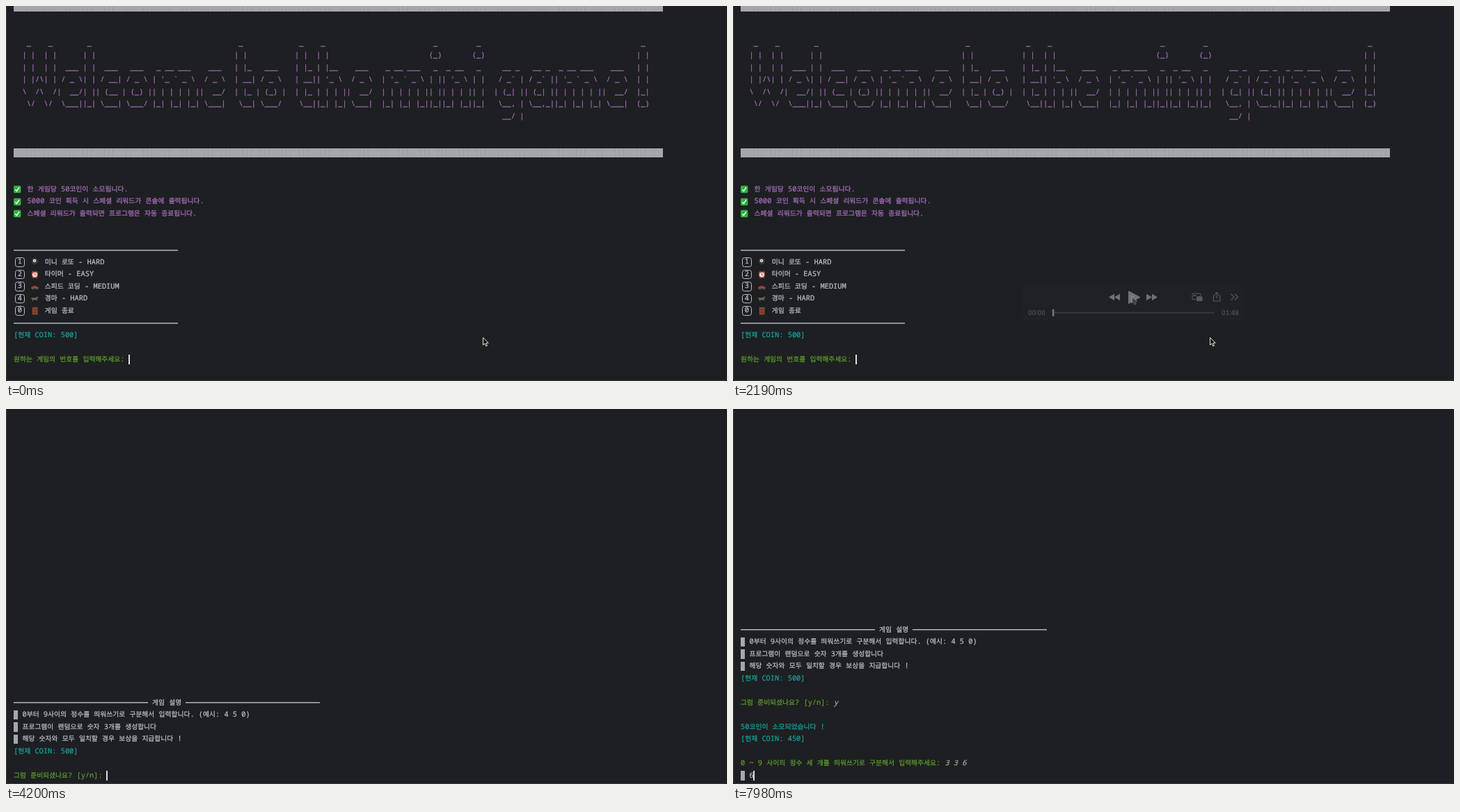
Write an HTML page that moves like this. It is 1036x540 px and loops after 8 s.

```html
<!DOCTYPE html>
<html lang="ko">
<head>
<meta charset="utf-8">
<style>
html, body { margin: 0; width: 100%; height: 100%; overflow: hidden; background: #17181a; }
#stage {
  position: absolute; left: 0; top: 0; width: 1036px; height: 540px; overflow: hidden;
  box-sizing: border-box; background: #1e1f22; border: solid #3a3b3f;
  border-width: 0 0 1px 1px; border-radius: 0 0 5px 5px;
}
#term {
  position: absolute; left: 10px; color: #bfc1c7;
  font: 10.367px/17.5px "Noto Sans Mono", "DejaVu Sans Mono", monospace;
  text-rendering: geometricPrecision; font-variant-ligatures: none;
  -webkit-text-stroke: .22px;
}
.row { display: flex; align-items: center; height: 17.5px; white-space: pre; }
.row > * { flex: none; }
.row > span { position: relative; top: .7px; }
.row > .key { top: 0; }
.ko { font-family: "Noto Sans CJK KR", "Noto Sans CJK", sans-serif; font-size: 9.75px; line-height: 0; }
.purple { color: #a771bf; }
.cyan { color: #16a5a0; }
.green { color: #5c9e2e; }
.typed { color: #93bd97; font-style: italic; }
.block {
  height: 13.7px;
  background: repeating-linear-gradient(90deg, #a6a7aa 0 5.6px, #9c9da0 5.6px 6.22px);
}
.rule { height: 2px; background: linear-gradient(#b4b6ba 50%, #66686b 50%); }
.caret { width: 2px; height: 14px; margin-left: -.8px; background: #dcdde0; }
.key {
  box-sizing: border-box; width: 13.5px; height: 13.5px; margin: 0 3.4px 0 2px;
  border: 1px solid #bcbec4; border-radius: 3.5px; line-height: 11.5px; text-align: center;
}
.icon { width: 13.4px; height: 12px; }
#over { position: absolute; left: -1px; top: 0; }
#over text { font: 8.7px Inter, Roboto, sans-serif; font-variant-numeric: tabular-nums; fill: #b9babd; }
</style>
</head>
<body>
<div id="stage">
  <div id="term"></div>
  <svg id="over" width="1036" height="540">
    <defs>
      <path id="arrow" d="M0 0V10.6L2.5 8.4L4.2 12.3L6 11.5L4.3 7.7H7.6Z"
        fill="#0c0c0d" stroke="#e6e6e8" stroke-width="1" stroke-linejoin="round"/>
    </defs>
    <g id="player" opacity="0">
      <rect x="416" y="403" width="318" height="50.5" rx="6" fill="#242529"/>
      <g fill="#e4e5e7">
        <path d="M548 414.5V424L540 419.2ZM556 414.5V424L548 419.2Z"/>
        <path d="M568.5 410.5V428.5L585 419.5Z" stroke="#e4e5e7" stroke-linejoin="round"/>
        <path d="M594 414.5V424L602 419.2ZM602 414.5V424L610 419.2Z"/>
      </g>
      <g fill="none" stroke="#a5a6a9" stroke-width="1.1">
        <path d="M665 422.5H661.5Q660 422.5 660 421V415.5Q660 414 661.5 414H670.5Q672 414 672 415.5V417"/>
        <rect x="666.5" y="418.5" width="7.5" height="6" rx="1" fill="#a5a6a9"/>
        <rect x="662" y="416" width="3" height="2" fill="#a5a6a9" stroke="none"/>
        <path d="M693 417H690.5V425H699.8V417H697.3M695.1 421V412.8M692.6 415L695.1 412.5L697.6 415"/>
        <path d="M715.5 414.5L720 419L715.5 423.5M721 414.5L725.5 419L721 423.5"/>
      </g>
      <text x="424" y="444.7">00:00</text>
      <text x="702" y="444.7">01:48</text>
      <rect x="460" y="440.5" width="232" height="2.6" rx="1.3" fill="#55565a"/>
      <rect x="458.8" y="436.5" width="2.6" height="10.5" rx="1" fill="#f0f0f1"/>
    </g>
    <use id="still" href="#arrow" x="685.5" y="477.5"/>
    <use id="pointer" href="#arrow" opacity="0"/>
  </svg>
</div>
<script>
const LOOP = 8000, CELL = 6.22;
const $ = id => document.getElementById(id);

// Banner lettering, one string per glyph with rows separated by newlines
const glyphs = {
  W: " _    _ \n| |  | |\n| |  | |\n| |/\\| |\n\\  /\\  /\n \\/  \\/ ",
  e: "\n\n  ___ \n / _ \\\n|  __/\n \\___|",
  l: " _ \n| |\n| |\n| |\n| |\n|_|",
  c: "\n\n  ___ \n / __|\n| (__ \n \\___|",
  o: "\n\n  ___  \n / _ \\ \n| (_) |\n \\___/ ",
  m: "\n\n _ __ ___  \n| '_ ` _ \\ \n| | | | | |\n|_| |_| |_|",
  t: " _   \n| |  \n| |_ \n| __|\n| |_ \n \\__|",
  h: " _     \n| |    \n| |__  \n| '_ \\ \n| | | |\n|_| |_|",
  i: " _ \n(_)\n _ \n| |\n| |\n|_|",
  n: "\n\n _ __  \n| '_ \\ \n| | | |\n|_| |_|",
  g: "\n\n  __ _ \n / _` |\n| (_| |\n \\__, |\n  __/ |",
  a: "\n\n  __ _ \n / _` |\n| (_| |\n \\__,_|",
  "!": " _ \n| |\n| |\n| |\n|_|\n(_)",
  " ": "  "
};

function banner(text) {
  const rows = Array(7).fill("  ");
  for (const ch of text) {
    const lines = glyphs[ch].split("\n");
    const width = Math.max(...lines.map(s => s.length));
    rows.forEach((r, i) => rows[i] = r + (lines[i] || "").padEnd(width));
  }
  return rows;
}

const esc = s => s.replace(/&/g, "&amp;").replace(/</g, "&lt;");
const txt = (s, cls = "") =>
  `<span class="${cls}">${esc(s).replace(/[가-힣]+/g, k => `<span class="ko">${k}</span>`)}</span>`;
const row = (...parts) => `<div class="row">${parts.join("")}</div>`;
const strip = (cls, cells) => `<i class="${cls}" style="width:${cells * CELL}px"></i>`;
const block = n => strip("block", n);
const rule = n => strip("rule", n);
const icon = body => `<svg class="icon" viewBox="0 0 13.4 12">${body}</svg>`;
const caret = `<i class="caret"></i>`;
const gap = row();

const check = icon(`<rect y=".8" width="10.4" height="10.4" rx="1.6" fill="#2fb43c"/>
  <path d="M2.4 6.2L4.4 8.6L8 3.2" fill="none" stroke="#fff" stroke-width="1.5"/>`);
const ball = icon(`<circle cx="5.4" cy="4.8" r="4.6" fill="#38393c"/>
  <circle cx="5" cy="3.8" r="2.3" fill="#e6e6e6"/><circle cx="5" cy="3.8" r=".8" fill="#333"/>`);
const clock = icon(`<path d="M1 3.5L3.6 1M9.8 3.5L7.2 1M2.4 11L3.4 9.6M8.4 11L7.4 9.6" stroke="#c2463c" stroke-width="1.6"/>
  <circle cx="5.4" cy="6" r="4" fill="#e9e4e0" stroke="#b8483e" stroke-width="1.2"/>
  <path d="M5.4 3.6V6L7 6.8" fill="none" stroke="#444" stroke-width=".8"/>`);
const car = icon(`<path d="M0 8.6L1 6L4 5.6L6 4.4L8 6L10.8 7V9H0Z" fill="#b93a32"/>
  <circle cx="2.6" cy="8.8" r="1.6" fill="#55565a"/><circle cx="8.4" cy="8.8" r="1.6" fill="#55565a"/>`);
const horse = icon(`<path d="M.5 4L3 4.2L7 4.4L8.6 2.2L10.6 3.8L9 5L8.4 7L10 9.4L7.4 7.4L3.6 7L2 10L2 6.4L.4 6Z" fill="#6d6a4f"/>
  <path d="M3.8 4H6.4V6H3.8Z" fill="#4d7a55"/>`);
const door = icon(`<rect x="1.8" y=".8" width="7.6" height="10.6" fill="#8f4c34"/>
  <path d="M3.2 2.4H8V5.2H3.2ZM3.2 6.6H8V9.6H3.2Z" fill="#70382a"/>`);

const item = (n, pic, label) => row(`<span class="key">${n}</span>`, txt(" "), pic, txt(" " + label));
const note = s => row(check, txt(" " + s, "purple"));
const coins = n => row(txt(`[현재 COIN: ${n}]`, "cyan"));
const prompt = (q, input, end = caret) => row(txt(q + " ", "green"), txt(input, "typed"), end);

const menuTop = [
  row(block(150)), gap, gap,
  ...banner("Welcome to the mini game !").map(s => row(txt(s, "purple"))),
  gap, gap, row(block(150)), gap, gap,
  note("한 게임당 50코인이 소모됩니다."),
  note("5000 코인 획득 시 스페셜 리워드가 콘솔에 출력됩니다."),
  note("스페셜 리워드가 출력되면 프로그램은 자동 종료됩니다."),
  gap, gap, row(rule(38)),
  item(1, ball, "미니 로또 - HARD"),
  item(2, clock, "타이머 - EASY"),
  item(3, car, "스피드 코딩 - MEDIUM"),
  item(4, horse, "경마 - HARD"),
  item(0, door, "게임 종료"),
  row(rule(38)), coins(500), gap
];
const rules = [
  row(rule(31), txt(" 게임 설명 "), rule(31)),
  ...["0부터 9사이의 정수를 띄워쓰기로 구분해서 입력합니다. (예시: 4 5 0)",
    "프로그램이 랜덤으로 숫자 3개를 생성합니다",
    "해당 숫자와 모두 일치할 경우 보상을 지급합니다 !"].map(s => row(block(1), txt(" " + s))),
  coins(500), gap
];
const spent = [gap, row(txt("50코인이 소모되었습니다 !", "cyan")), coins(450), gap];

const CLEAR = 3330, INTRO = 3660, READY = 4920, DRAW = 6810;
const numbers = [[5490, "3"], [5640, "3 "], [5820, "3 3"], [6000, "3 3 "], [6450, "3 3 6"]];
const rolls = "2857406";

const typed = (steps, t) => steps.reduce((s, [at, str]) => t >= at ? str : s, "");

function screen(t) {
  if (t < CLEAR) return [...menuTop, prompt("원하는 게임의 번호를 입력해주세요:", t >= 2820 ? "1" : "")];
  if (t < INTRO) return [row(caret)];
  const ready = end => prompt("그럼 준비되셨나요? [y/n]:", t >= 4620 ? "y" : "", end);
  if (t < READY) return [...rules, ready()];
  const ask = end => prompt("0 ~ 9 사이의 정수 세 개를 띄워쓰기로 구분해서 입력해주세요:", typed(numbers, t), end);
  if (t < DRAW) return [...rules, ready(""), ...spent, ask()];
  const digit = rolls[Math.min(rolls.length - 1, Math.floor((t - DRAW) / 180))];
  return [...rules, ready(""), ...spent, ask(""), row(block(1), txt(" " + digit), caret)];
}

// Pointer track: time, x, y
const track = [[30, 240, 514], [240, 263, 498], [600, 263, 498], [960, 548, 422], [1500, 548, 422], [1650, 573, 417.5]];
const ramp = (t, a, b) => Math.min(1, Math.max(0, (t - a) / (b - a)));

function pointerAt(t) {
  let [, x, y] = track[0];
  for (let i = 1; i < track.length; i++) {
    const [a] = track[i - 1], [b, nx, ny] = track[i];
    const k = ramp(t, a, b), e = k * k * (3 - 2 * k);
    x += (nx - x) * e;
    y += (ny - y) * e;
  }
  return [x, y];
}

let shown = "";
function draw(t) {
  const html = screen(t).join("");
  if (html !== shown) {
    $("term").innerHTML = shown = html;
    $("term").style.top = (t < CLEAR ? 517.75 : 536.75) - 17.5 * $("term").children.length + "px";
  }
  const out = 1 - ramp(t, 1980, 2340);
  $("player").setAttribute("opacity", ramp(t, 30, 240) * out);
  $("pointer").setAttribute("opacity", t < 30 ? 0 : out);
  $("pointer").setAttribute("transform", `translate(${pointerAt(t)})`);
  $("still").setAttribute("opacity", t < 2820 ? 1 : 0);
}

const start = performance.now();
function tick() {
  draw((performance.now() - start) % LOOP);
  requestAnimationFrame(tick);
}
tick();
</script>
</body>
</html>
```
